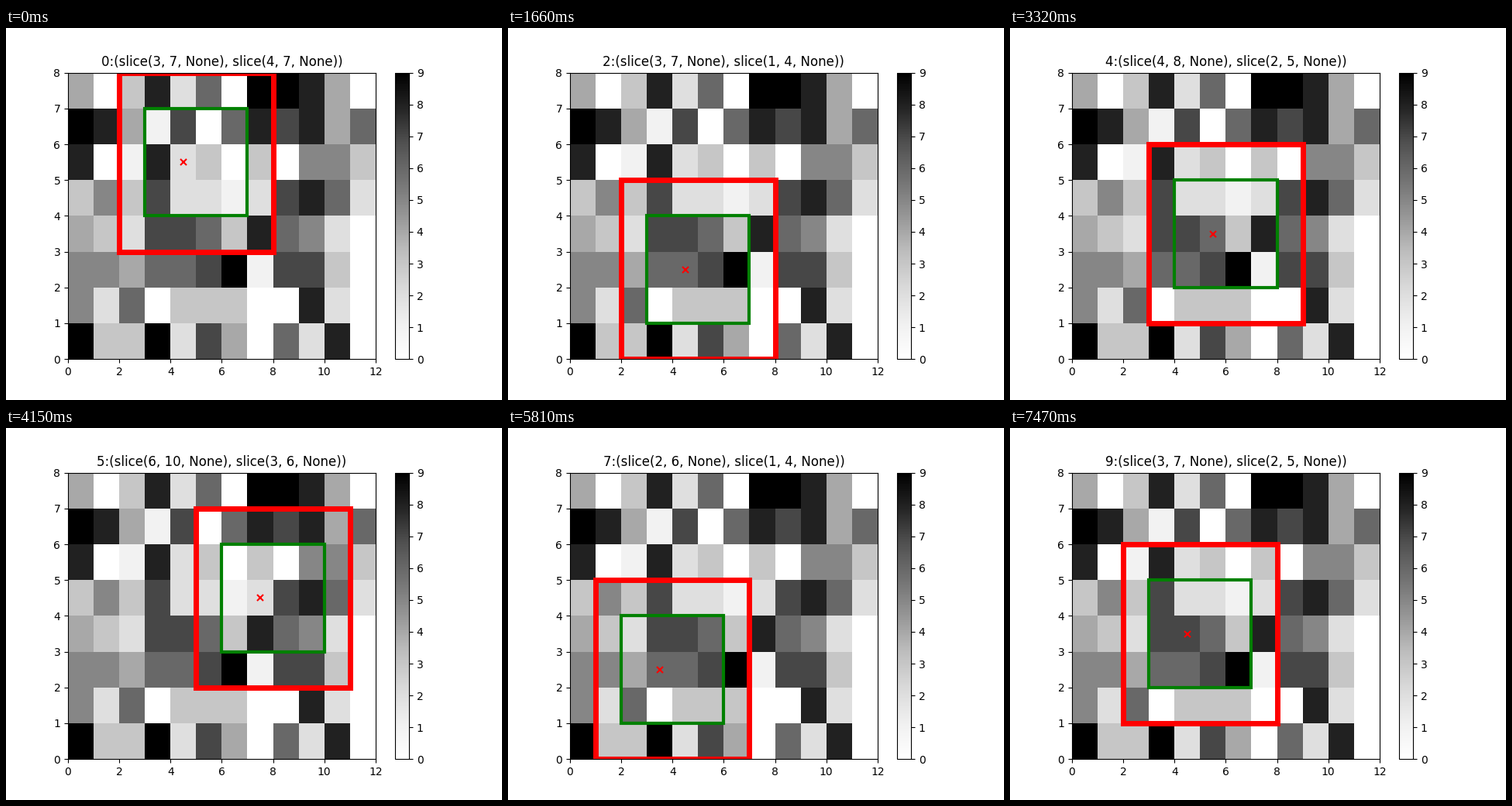
Write a matplotlib script that moves like this. It is 640 px wide and 480 px high and loops after 8.3 s.

```python
import numpy as np
import matplotlib.pyplot as plt
from matplotlib.animation import FuncAnimation
from matplotlib.patches import Rectangle

# Grid values, bottom row first
GRID = np.array([
    [9, 3, 3, 9, 2, 7, 4, 0, 6, 2, 8, 0],
    [5, 2, 6, 0, 3, 3, 3, 0, 0, 8, 2, 0],
    [5, 5, 4, 6, 6, 7, 9, 1, 7, 7, 3, 0],
    [4, 3, 2, 7, 7, 6, 3, 8, 6, 5, 2, 0],
    [3, 5, 3, 7, 2, 2, 1, 2, 7, 8, 6, 2],
    [8, 0, 1, 8, 2, 3, 0, 3, 0, 5, 5, 3],
    [9, 8, 4, 1, 7, 0, 6, 8, 7, 8, 4, 6],
    [4, 0, 3, 8, 2, 6, 0, 9, 9, 8, 4, 0],
])

# Lower left corner of the inner window at each step
CORNERS = [(3, 4), (4, 2), (3, 1), (5, 3), (4, 2),
           (6, 3), (7, 2), (2, 1), (2, 3), (3, 2)]
WIDTH, HEIGHT = 4, 3
MARGIN = 1
STEP_MS = 830

plt.rcParams["font.family"] = "DejaVu Sans"
fig, ax = plt.subplots(figsize=(6.4, 4.8), dpi=100)
mesh = ax.pcolormesh(GRID, cmap="Greys", vmin=0, vmax=9)
fig.colorbar(mesh, ax=ax, ticks=range(10))


def add_box(width, height, color, lw):
    box = Rectangle((0, 0), width, height, fill=False, edgecolor=color, lw=lw)
    return ax.add_patch(box)


outer = add_box(WIDTH + 2 * MARGIN, HEIGHT + 2 * MARGIN, "red", 5)
inner = add_box(WIDTH, HEIGHT, "green", 3)
cross, = ax.plot([], [], "x", color="red", markersize=6, markeredgewidth=1.5)
title = ax.set_title("")
ax.set(xlim=(0, 12), ylim=(0, 8))


def update(step):
    x, y = CORNERS[step]
    outer.set_xy((x - MARGIN, y - MARGIN))
    inner.set_xy((x, y))
    cross.set_data([x + 1.5], [y + 1.5])
    window = (slice(x, x + WIDTH), slice(y, y + HEIGHT))
    title.set_text(f"{step}:{window}")
    return outer, inner, cross, title


anim = FuncAnimation(fig, update, frames=len(CORNERS), interval=STEP_MS,
                     repeat=True, repeat_delay=0, blit=False)
plt.show()
```
